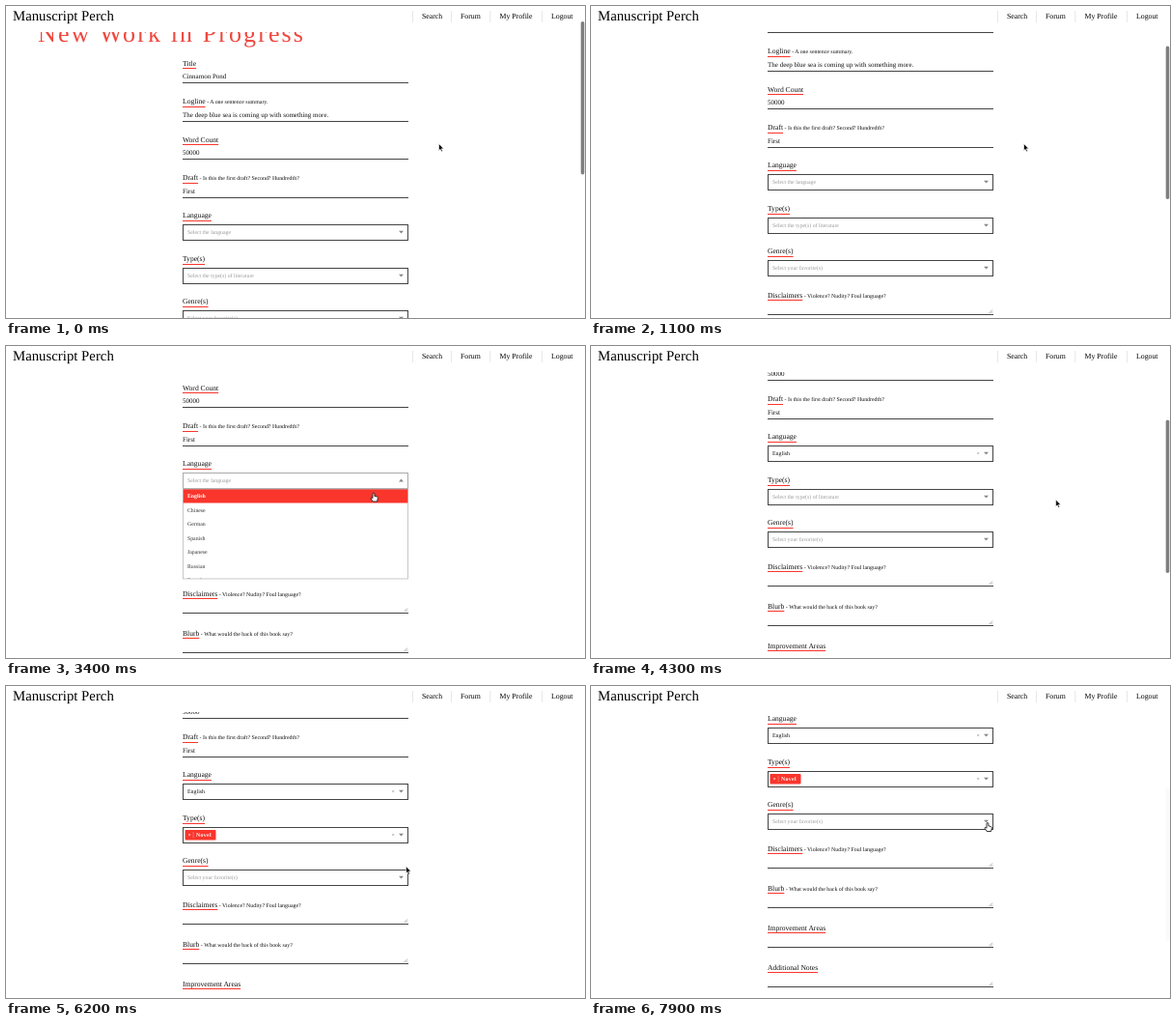
An HTML page for the animation above (8 s loop, 600 px wide and 323 px high).

```html
<!DOCTYPE html>
<html lang="en">
<head>
<meta charset="utf-8">
<title>New Work in Progress</title>
<style>
  html, body { margin: 0; width: 100%; height: 100%; overflow: hidden; background: #fff; }
  svg { display: block; width: 100vw; height: 100vh; }
  text { font-family: "Liberation Serif", "Times New Roman", serif; fill: #111; text-rendering: geometricPrecision; white-space: pre; }
  .brand { font-size: 14.8px; fill: #000; }
  .nav { font-size: 7.8px; fill: #000; }
  .heading { font-size: 26px; letter-spacing: 2.1px; fill: #f0483f; }
  .label { font-size: 7.6px; }
  .hint { font-size: 5.9px; }
  .value { font-size: 7px; }
  .option { font-size: 5.8px; fill: #333; }
  .placeholder { font-size: 5.8px; fill: #999; }
  .active { fill: #fff; font-weight: bold; }
  .tag { font-size: 5.8px; font-weight: bold; fill: #fff; letter-spacing: .35px; }
  .clear { font-size: 6px; fill: #777; }
  .red { fill: #f9352c; }
  .line { fill: none; stroke: #444; stroke-width: 1; }
  .open { stroke: #aaa; }
</style>
</head>
<body>
<svg id="stage" viewBox="0 0 600 323" preserveAspectRatio="none"></svg>
<script>
const LOOP = 8000, STEP = 100;
const LEFT = 183, RIGHT = 417, WIDTH = RIGHT - LEFT, ROW = 14.5, BOX = 16, LIST = 93;
const stage = document.getElementById('stage');

function add(parent, tag, attrs = {}, content = '') {
  const el = document.createElementNS('http://www.w3.org/2000/svg', tag);
  for (const key in attrs) el.setAttribute(key, attrs[key]);
  el.textContent = content;
  parent.append(el);
  return el;
}
const group = parent => add(parent, 'g');
const text = (parent, cls, x, y, content) => add(parent, 'text', { class: cls, x, y }, content);
const rect = (parent, x, y, width, height, more) => add(parent, 'rect', { x, y, width, height, ...more });
const path = (parent, d, more) => add(parent, 'path', { d, ...more });
const show = (el, on) => el.setAttribute('visibility', on ? 'inherit' : 'hidden');
const move = (el, x, y) => el.setAttribute('transform', `translate(${x} ${y})`);
const snap = y => Math.floor(y) + .5;

const page = group(stage);

function label(y, name, hint) {
  const width = text(page, 'label', LEFT, y + 2.5, name).getComputedTextLength();
  rect(page, LEFT, Math.round(y + 5), width, 1, { class: 'red' });
  if (hint) text(page, 'hint', LEFT + width + 1.5, y + 2.5, '- ' + hint);
}

function underline(y) {
  path(page, `M${LEFT} ${snap(y)}H${RIGHT}`, { class: 'line' });
}

function field(y, name, hint, value) {
  label(y, name, hint);
  text(page, 'value', LEFT, y + 16, value);
  underline(y + 20.5);
}

function area(y, name, hint) {
  label(y, name, hint);
  underline(y + 20.4);
  path(page, `M412.5 ${y + 19}l3.5-3.5M414.5 ${y + 19}l1.5-1.5`, { stroke: '#777', 'stroke-width': .6 });
}

function select(y, name, hint) {
  label(y - 9.6, name);
  const frame = rect(page, LEFT + .5, y, WIDTH - 1, BOX, { class: 'line' });
  const placeholder = text(page, 'placeholder', 188, y + 9.8, hint);
  const down = path(page, `M407 ${y + 6.2}h5l-2.5 2.9z`, { fill: '#888' });
  const up = path(page, `M407 ${y + 9}h5l-2.5-2.9z`, { fill: '#888' });
  const chosen = group(page);
  text(chosen, 'clear', 399.5, y + 9.8, '×');
  return {
    y, chosen,
    update(open, filled) {
      frame.setAttribute('class', open ? 'line open' : 'line');
      show(placeholder, !filled);
      show(chosen, filled);
      show(down, !open);
      show(up, open);
    }
  };
}

function dropdown(y, id, names) {
  const list = group(page);
  const clip = add(add(stage, 'defs'), 'clipPath', { id });
  rect(clip, LEFT, y, WIDTH, LIST);
  rect(list, LEFT - 1, y, WIDTH + 2, LIST, { fill: '#fff' });
  const inner = add(list, 'g', { 'clip-path': `url(#${id})` });
  const bar = rect(inner, LEFT, y, WIDTH, ROW, { class: 'red' });
  const rows = names.map((name, i) => text(inner, 'option', 188, y + i * ROW + 9.1, name));
  rect(list, LEFT + .5, y, WIDTH - 1, LIST, { fill: 'none', stroke: '#bbb', 'stroke-width': .8 });
  return (open, pointerY) => {
    show(list, open);
    const hovered = Math.max(0, Math.floor((pointerY - y) / ROW));
    bar.setAttribute('y', y + hovered * ROW);
    rows.forEach((row, i) => row.setAttribute('class', i === hovered ? 'option active' : 'option'));
  };
}

// Form
text(page, 'heading', 33, 37, 'New Work in Progress');
[
  ['Title', '', 'Cinnamon Pond'],
  ['Logline', 'A one sentence summary.', 'The deep blue sea is coming up with something more.'],
  ['Word Count', '', '50000'],
  ['Draft', 'Is this the first draft? Second? Hundredth?', 'First']
].forEach((row, i) => field(59 + i * 39.5, ...row));

const [language, type, genre] = [
  ['Language', 'Select the language'],
  ['Type(s)', 'Select the type(s) of literature'],
  ['Genre(s)', 'Select your favorite(s)']
].map((row, i) => select(snap(226.5 + i * 44.5), ...row));

[
  ['Disclaimers', 'Violence? Nudity? Foul language?'],
  ['Blurb', 'What would the back of this book say?'],
  ['Improvement Areas'],
  ['Additional Notes']
].forEach((row, i) => area(351 + i * 41.1, ...row));

text(language.chosen, 'hint', 188, language.y + 9.8, 'English');
rect(type.chosen, 185.5, type.y + 2.5, 32, 10.5, { class: 'red', rx: 1 });
text(type.chosen, 'tag', 188.5, type.y + 9.5, '×');
rect(type.chosen, 193.8, type.y + 4.5, .5, 6.5, { fill: '#ffa7a2' });
text(type.chosen, 'tag', 197, type.y + 9.6, 'Novel');
const caret = rect(page, 187.8, type.y + 4, .7, 8, { fill: '#222' });

const languageList = dropdown(language.y + BOX + .5, 'languages',
  ['English', 'Chinese', 'German', 'Spanish', 'Japanese', 'Russian', 'French']);
const typeList = dropdown(type.y + BOX + .5, 'types',
  ['Fiction', 'Nonfiction', 'Novel', 'Novella', 'Poetry', 'Short Story', 'Screenplay']);

// Header, scrollbar and pointer
rect(stage, 0, 0, 600, 27, { fill: '#fff' });
text(stage, 'brand', 7, 15.2, 'Manuscript Perch');
[['Search', 431], ['Forum', 471], ['My Profile', 511.5], ['Logout', 565]].forEach(([name, x]) => {
  text(stage, 'nav', x, 13.3, name);
  rect(stage, x - 10, 5, .7, 12, { fill: '#ddd' });
});
const thumb = rect(stage, 595.7, 0, 3.6, 158.5, { rx: 1.8, fill: '#7f7f7f' });
const arrow = path(stage, 'M0 0V7.2L1.6 5.8 2.7 8.3 3.9 7.8 2.8 5.3H5Z',
  { fill: '#000', stroke: '#fff', 'stroke-width': .6 });
const hand = path(stage, 'M-1 .6Q0-.6 .9 .6V3.4L3.6 4Q4.5 4.3 4.3 5.5L3.6 9H-.8L-3 5.8Q-3 4.6-1.9 4.9L-1 5.7Z',
  { fill: '#fff', stroke: '#222', 'stroke-width': .9, 'stroke-linejoin': 'round' });

// Motion: each gesture eases over its own span of time
const swipes = [
  { from: 0, to: 200, by: 2 },
  { from: 300, to: 600, by: 32 },
  { from: 900, to: 1350, by: 44 },
  { from: 1400, to: 1700, by: 17 },
  { from: 3800, to: 4400, by: 30 },
  { from: 6850, to: 7700, by: 58 }
];
const glides = [
  { from: 1550, to: 2400, x: 409.5, y: 138.5 },
  { from: 2900, to: 3400, x: 381, y: 152 },
  { from: 3500, to: 3700, x: 529, y: 162 },
  { from: 4000, to: 4700, x: 408.8, y: 154.5 },
  { from: 5200, to: 5600, x: 403, y: 190 },
  { from: 6000, to: 6800, x: 477, y: 168.5 },
  { from: 7000, to: 7700, x: 411, y: 141.5 }
];
const clamp = v => Math.min(1, Math.max(0, v));
const within = (t, from, to) => t >= from && t < to;

function ease(t, { from, to }) {
  const k = clamp((t - from) / (to - from));
  return k * k * (3 - 2 * k);
}

const scrollAt = t => Math.round(swipes.reduce((sum, swipe) => sum + swipe.by * ease(t, swipe), 0));

function pointerAt(t) {
  return glides.reduce(({ x, y }, glide) => {
    const k = ease(t, glide);
    return { x: x + (glide.x - x) * k, y: y + (glide.y - y) * k };
  }, { x: 448.5, y: 142.5 });
}

const thumbPulse = (t, from, to) => t < from ? 0 : clamp(1 - (t - to) / 208);

function draw(now) {
  const t = Math.floor(now % LOOP / STEP) * STEP;
  const scroll = scrollAt(t);
  const { x, y } = pointerAt(t);
  const languageOpen = within(t, 2900, 3600), typeOpen = within(t, 4800, 6000);

  move(page, 0, -scroll);
  thumb.setAttribute('y', 16 + scroll * .492);
  thumb.setAttribute('opacity', Math.max(
    thumbPulse(t, 0, 2200), thumbPulse(t, 3900, 4700), thumbPulse(t, 7100, 7700)) *
    (within(t, 2400, 3900) ? 0 : 1));
  language.update(languageOpen, t >= 3600);
  type.update(typeOpen, t >= 6000);
  genre.update(false, false);
  languageList(languageOpen, y + scroll);
  typeList(typeOpen, y + scroll);
  show(caret, typeOpen && t < 5700);

  const pointing = within(t, 2400, 3600) || within(t, 4600, 6100) || t >= 7600;
  show(hand, pointing);
  show(arrow, !pointing);
  move(hand, x, y);
  move(arrow, x, y);
}

const start = performance.now();
function tick() {
  draw(performance.now() - start);
  requestAnimationFrame(tick);
}
tick();
</script>
</body>
</html>
```
